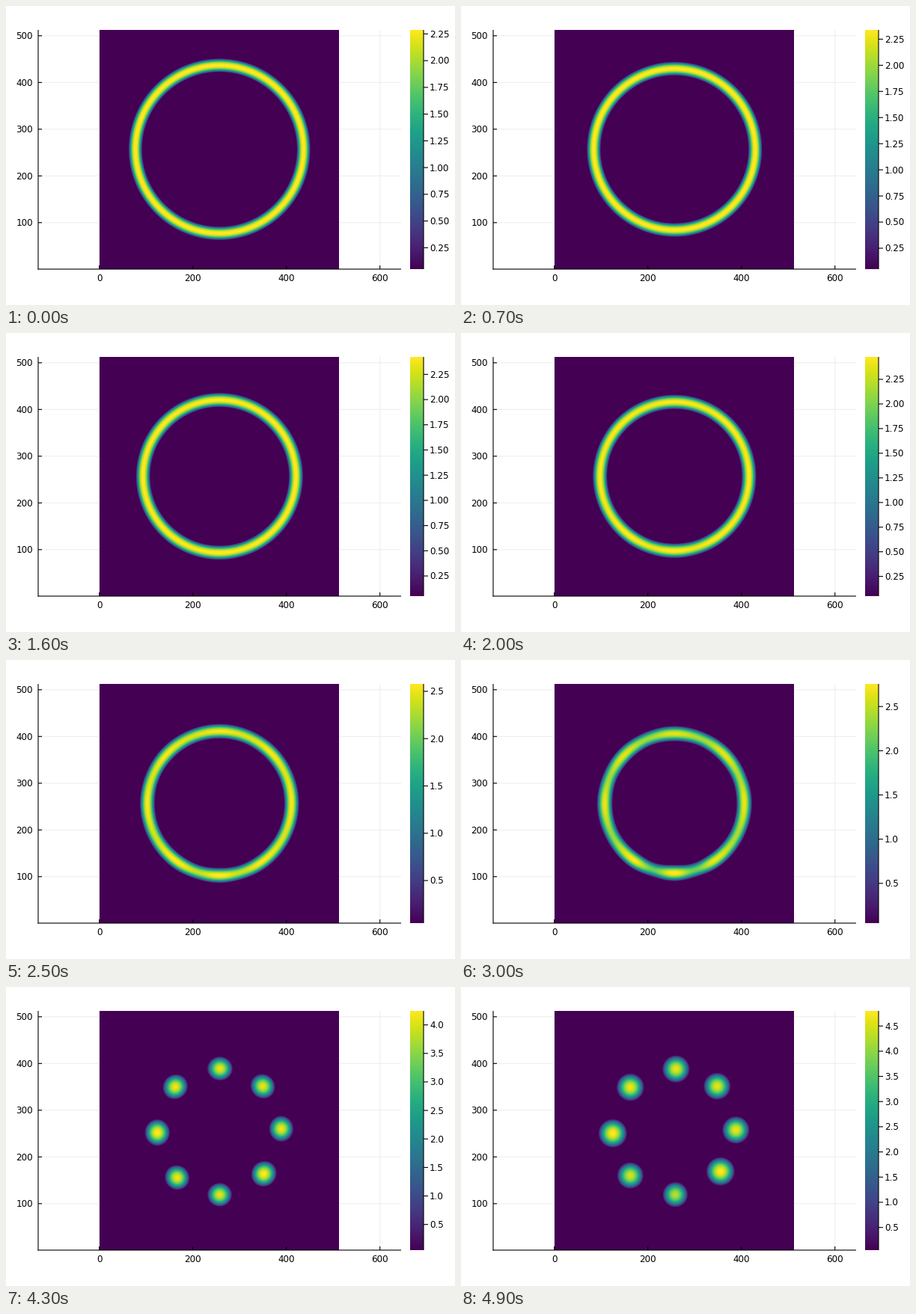
A matplotlib script for the animation above (4.95 s loop, 600 by 400 pixels).

```python
import numpy as np
import matplotlib.pyplot as plt
from matplotlib.animation import FuncAnimation

FRAMES, INTERVAL = 99, 50
LEFT, RIGHT, TOP, BOTTOM = 43, 528, 32, 352
CX, CY = 285, 192            # middle of the heat map in pixels
OFFSET = 0.3                 # the ring sits slightly right of and above it
FILM = 0.05                  # height of the flat film
SPREAD = 4.0                 # half-width of a ridge per unit of height
PINCH, LAST = 77, FRAMES - 1

# Eight drops, counter-clockwise from the right-hand one
ANGLE_KEYS = np.radians([
    [1.5, 2.3, 0.3], [44, 45.2, 46], [90, 90.3, 88.6], [137, 135.2, 135.7],
    [180, 181.6, 182.8], [234.6, 230.2, 225.7], [269.7, 269.7, 270.7],
    [304.6, 313.3, 318.2]])
END_RADIUS = np.array([82, 82, 82, 82.4, 82.6, 84.5, 86, 82.5])
MID_HEIGHT = np.array([3.1, 3.0, 2.95, 3.0, 3.1, 3.4, 3.545, 3.1])
END_HEIGHT = np.array([4.6, 4.55, 4.6, 4.65, 4.8, 4.45, 4.25, 4.8])
# Ridge height halfway to the next drop
MID_NECK = np.array([1.9, 1.7, 1.6, 1.8, 1.5, 0.5, 0.6, 1.9])

axis = np.arange(320) + 0.5 - 160
gx, gy = np.meshgrid(axis - OFFSET, -axis - OFFSET)
rad, theta = np.hypot(gx, gy), np.arctan2(gy, gx)


def wrap(a):
    return (a + np.pi) % (2 * np.pi) - np.pi


def smooth(x):
    x = np.clip(x, 0, 1)
    return x * x * (3 - 2 * x)


def ring_radius(n):
    return 112.4 - 0.32 * min(n, PINCH)


def ring_height(n):
    # The volume of the ring stays constant
    return np.sqrt(587 / ring_radius(n))


def drops(n):
    """Angle, radius and height of each drop, and the necks between them."""
    ang = np.array([np.interp(n, [60, PINCH, LAST], k) for k in ANGLE_KEYS])
    base = ring_height(n)
    grown = ring_height(PINCH)
    late = max(n - PINCH, 0)
    shift = min(late / 10, 1)
    radius = ring_radius(n) * (1 - shift) + END_RADIUS * shift
    if late:
        p = late / (LAST - PINCH)
        height = MID_HEIGHT + (END_HEIGHT - MID_HEIGHT) * (1 - (1 - p) ** 2)
    else:
        height = base + (MID_HEIGHT - grown) * np.exp((n - PINCH) / 12.5)
    neck = base - (grown - MID_NECK) * np.exp((n - PINCH) / 10.3)
    return ang, radius, height, np.maximum(neck, -1.5)


def field(n):
    ang, radius, height, neck = drops(n)
    offsets = wrap(theta[None] - ang[:, None, None])
    i = np.abs(offsets).argmin(axis=0)
    d = np.take_along_axis(offsets, i[None], axis=0)[0]

    gap = (np.roll(ang, -1) - ang) % (2 * np.pi)
    half = np.where(d > 0, gap[i], gap[i - 1]) / 2
    low = np.where(d > 0, neck[i], neck[i - 1])
    top = height[i]

    # Wavy ridge turning into round caps
    b = smooth((n - 76) / 14)
    wave = low + (top - low) * (0.5 + 0.5 * np.cos(np.pi * d / half))
    side = rad * np.sin(d)
    cap = np.maximum(top - side ** 2 / (SPREAD ** 2 * top), -1.5)
    crest = (1 - b) * wave + b * cap

    across = ((1 - b) * (rad - np.interp(theta, ang, radius, period=2 * np.pi))
              + b * (rad * np.cos(d) - radius[i]))
    scale = (1 - b) * np.interp(theta, ang, height, period=2 * np.pi) + b * top
    h = crest - across ** 2 / (SPREAD ** 2 * scale)
    return FILM + 0.5 * (h + np.sqrt(h * h + 0.005)), height.max()


fig = plt.figure(figsize=(6, 4), dpi=100, facecolor="white")
ax = fig.add_axes([0, 0, 1, 1])
ax.axis("off")


def line(x, y, color="black", z=3):
    return ax.plot(x, y, color=color, lw=0.8, solid_capstyle="butt",
                   snap=False, zorder=z)[0]


def label(x, y, s, ha):
    return ax.text(x, y + 4.4, s, ha=ha, va="baseline", fontsize=8.64,
                   family="DejaVu Sans", color="black")


def data_x(v):
    return CX + (v - 256.5) * 0.625


def data_y(v):
    return CY - (v - 256.5) * 0.625


for v in (0, 200, 400, 600):
    x = data_x(v)
    line([x, x], [TOP, BOTTOM], "#eeeeee", z=0)
    line([x, x], [BOTTOM, BOTTOM - 5])
    label(x, 363.6, str(v), "center")
for v in range(100, 501, 100):
    y = data_y(v)
    line([LEFT, RIGHT], [y, y], "#eeeeee", z=0)
    line([LEFT, LEFT + 5], [y, y])
    label(36, y, str(v), "right")
line([LEFT, LEFT], [TOP, BOTTOM + 0.5])
line([LEFT - 0.5, RIGHT], [BOTTOM, BOTTOM])

heat = ax.imshow(np.zeros((320, 320)), cmap="viridis", aspect="auto",
                 interpolation="nearest", extent=(125, 445, BOTTOM, TOP), zorder=1)
ax.imshow(np.linspace(1, 0, 320)[:, None], cmap="viridis", aspect="auto",
          interpolation="nearest", extent=(540, 558, BOTTOM, TOP), zorder=1)
line([558, 558], [TOP, BOTTOM])
bar_ticks = [line([558, 564], [0, 0]) for _ in range(11)]
bar_labels = [label(566, 0, "", "left") for _ in range(11)]
ax.set_xlim(0, 600)
ax.set_ylim(400, 0)


def update(n):
    h, peak = field(n)
    heat.set_data(h)
    heat.set_clim(FILM, peak)
    step, digits = (0.25, 2) if n < 46 else (0.5, 1)
    for k, (tick, text) in enumerate(zip(bar_ticks, bar_labels), 1):
        v = k * step
        shown = v <= peak
        tick.set_visible(shown)
        text.set_visible(shown)
        if shown:
            y = BOTTOM - (v - FILM) / (peak - FILM) * (BOTTOM - TOP)
            tick.set_ydata([y, y])
            text.set_y(y + 4.4)
            text.set_text(f"{v:.{digits}f}")
    return [heat, *bar_ticks, *bar_labels]


anim = FuncAnimation(fig, update, frames=FRAMES, interval=INTERVAL,
                     repeat=True, repeat_delay=0, blit=False)
plt.show()
```
